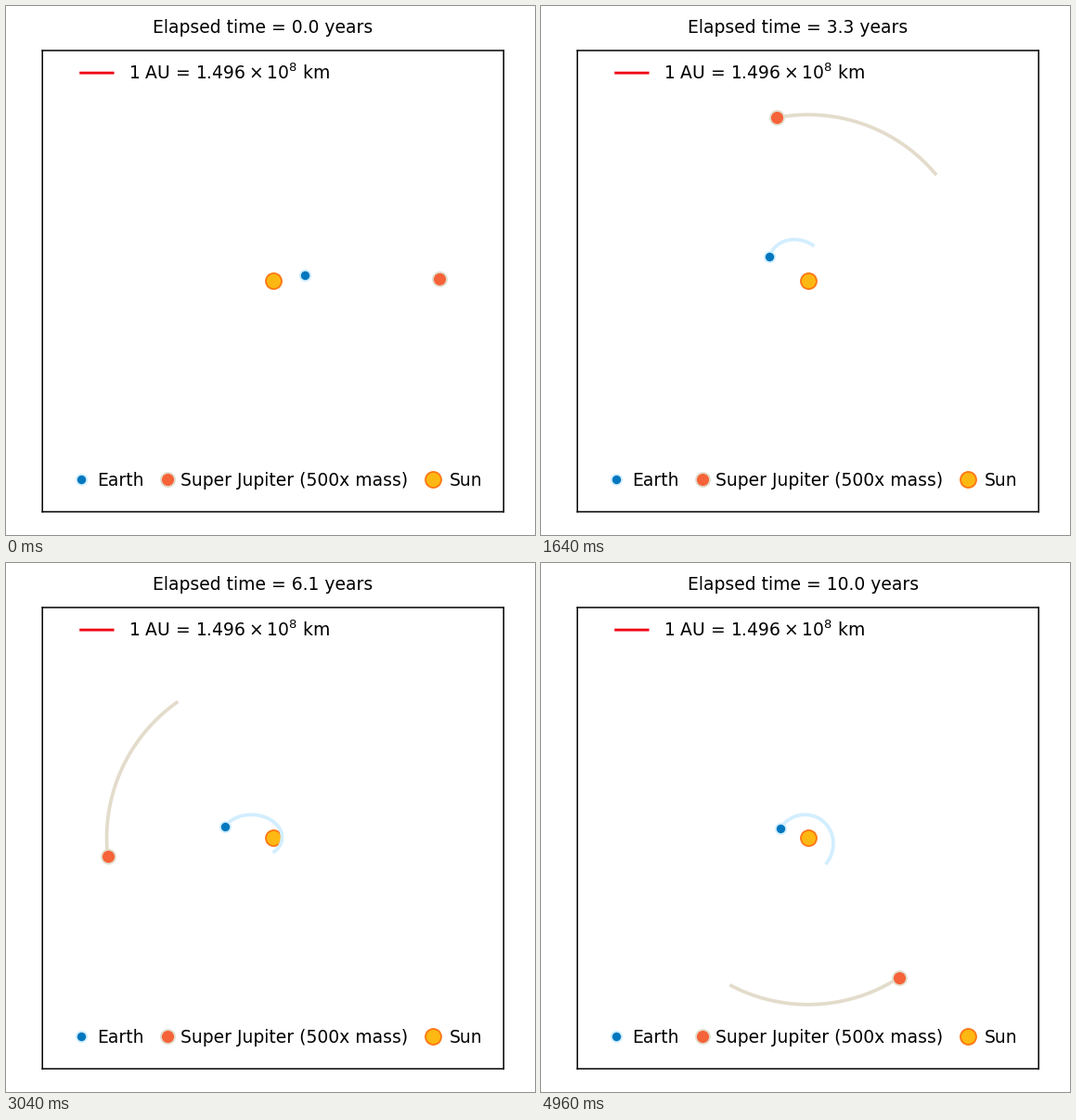
These frames come from a looping animation (570 px wide and 570 px high, 5 s). A matplotlib script:

```python
import numpy as np
import matplotlib.pyplot as plt
from matplotlib.animation import FuncAnimation

STAGE = 570
PT = 1.353  # point scale at 100 dpi
FRAMES, INTERVAL = 125, 40
FIRST, STRIDE = 3, 8  # simulation steps at the start and per frame
EARTH_TRAIL, JUPITER_TRAIL = 40, 200

# Units: AU, years, solar masses
GM_SUN = 39.643
GM_JUPITER = 0.475 * GM_SUN
DT = 120 / 11999
STEPS = FIRST + STRIDE * FRAMES

EARTH = dict(color="#d2eeff", markerfacecolor="#0077be", markersize=6 * PT)
JUPITER = dict(color="#e3dccb", markerfacecolor="#f66338", markersize=8 * PT)
SUN = dict(color="#fd7813", markerfacecolor="#fdb813", markersize=9 * PT)


def pull(gm, offset):
    return gm * offset / np.hypot(*offset) ** 3


def derivative(state):
    """State rows: Earth position, Jupiter position, and their velocities."""
    earth, jupiter, v_earth, v_jupiter = state
    a_earth = pull(GM_SUN, -earth) + pull(GM_JUPITER, jupiter - earth)
    a_jupiter = pull(GM_SUN, -jupiter)
    return np.array([v_earth, v_jupiter, a_earth, a_jupiter])


def simulate():
    state = np.array([[1, 0], [5.2, 0], [0, np.sqrt(GM_SUN)], [0, 2.76]])
    path = [state]
    for _ in range(STEPS):
        k1 = derivative(state)
        k2 = derivative(state + DT / 2 * k1)
        k3 = derivative(state + DT / 2 * k2)
        k4 = derivative(state + DT * k3)
        state = state + DT / 6 * (k1 + 2 * k2 + 2 * k3 + k4)
        path.append(state)
    path = np.array(path)
    return path[:, 0], path[:, 1]


earth_path, jupiter_path = simulate()

plt.rcParams.update({"font.family": "DejaVu Sans", "font.size": 10 * PT,
                     "path.snap": False})
fig = plt.figure(figsize=(STAGE / 100, STAGE / 100), dpi=100, facecolor="white")
ax = fig.add_axes([39.2 / STAGE, 25.05 / STAGE, 497 / STAGE, 497 / STAGE])
ax.set(xlim=(-7.2, 7.2), ylim=(-7.2, 7.2), xticks=[], yticks=[])
for spine in ax.spines.values():
    spine.set_linewidth(0.8 * PT)


def body(x, y, style, label=None, gap=0.5):
    ax.plot(x, y, "o", markeredgewidth=PT, **style)
    if label:
        ax.text(x + gap, y - 0.2, label)


def trail(style):
    line, = ax.plot([], [], "o-", lw=2 * PT, markevery=10000,
                    markeredgewidth=PT, **style)
    return line


body(0, 0, SUN)
earth_line = trail(EARTH)
jupiter_line = trail(JUPITER)

ax.plot([-6, -5], [6.5, 6.5], color="#ee0014", lw=1.5 * PT)
ax.text(-4.5, 6.3, r"1 AU = $1.496 \times 10^8$ km")
body(-6, -6.2, EARTH, "Earth")
body(-3.3, -6.2, JUPITER, "Super Jupiter (500x mass)", 0.4)
body(5, -6.2, SUN, "Sun")
title = ax.text(0.24, 1.05, "", transform=ax.transAxes, va="center")


def update(frame):
    i = FIRST + STRIDE * frame
    title.set_text(f"Elapsed time = {i * DT:.1f} years")
    for line, path, length in ((earth_line, earth_path, EARTH_TRAIL),
                               (jupiter_line, jupiter_path, JUPITER_TRAIL)):
        line.set_data(*path[i:max(1, i - length):-1].T)
    return earth_line, jupiter_line, title


anim = FuncAnimation(fig, update, frames=FRAMES, interval=INTERVAL,
                     repeat=True, repeat_delay=0)
plt.show()
```
